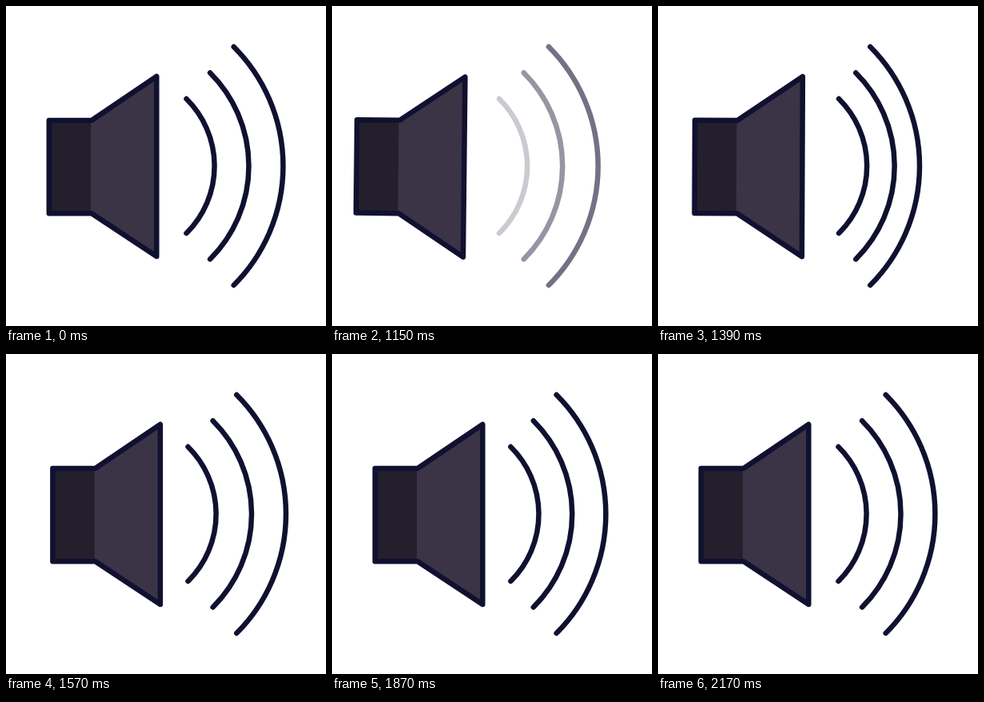
Animation of 400x400 px, one loop 2.23 s. Source, as an HTML page with a canvas:

```html
<!DOCTYPE html>
<html lang="en">
<head>
<meta charset="utf-8">
<title>Speaker</title>
<style>
  html, body { margin: 0; width: 100%; height: 100%; overflow: hidden; background: #fff; }
  canvas { display: block; width: 400px; height: 400px; }
</style>
</head>
<body>
<canvas id="stage" width="400" height="400"></canvas>
<script>
const ctx = document.getElementById('stage').getContext('2d');
const LOOP = 2230, START = 1030, STEP = 30, LAST = 2170;
const INK = '#101130', BOX = '#241f2c', CONE = '#3b3346';
const WAVES = 3, LEAD = 978;

// Eased progress from 0 to 1 between two times.
function glide(t, from, to) {
  const u = Math.min(1, Math.max(0, (t - from) / (to - from)));
  return u * u * (3 - 2 * u);
}

function drawSpeaker(t) {
  const left = 53.8, neck = 107, right = 188.3, middle = 200.9;
  const recoil = glide(t, LEAD, 1172);
  const x = -24 * recoil + 28.6 * glide(t, 1172, 1575) - 4.6 * glide(t, 1575, 1830);
  const tilt = 0.65 * (recoil - glide(t, 1172, 1550));

  const outline = new Path2D();
  outline.moveTo(left, 143);
  outline.lineTo(neck, 143);
  outline.lineTo(right, 88);
  outline.lineTo(right, 313);
  outline.lineTo(neck, 259.3);
  outline.lineTo(left, 259.3);
  outline.closePath();

  ctx.save();
  ctx.translate(121 + x, middle);
  ctx.rotate(tilt * Math.PI / 180);
  ctx.translate(-121, -middle);
  ctx.fillStyle = CONE;
  ctx.fill(outline);
  ctx.fillStyle = BOX;
  ctx.fillRect(left, 143, 106 - left, 116.3);
  ctx.stroke(outline);
  ctx.restore();
}

// Pulled back, thrown past rest, back a little, then settled; outer waves lag.
function waveOffset(i, t) {
  const dip = 1216 + 40 * i, peak = dip + 228 + 20 * i * i;
  const low = 1790 + 48 * i, rest = 2086 + 47 * i;
  const pull = 20.3 + 3 * i, throwOut = 4 + 0.3 * i, rebound = 2.6 + 0.8 * i;
  return -pull * glide(t, LEAD + 8 * i, dip)
    + (pull + throwOut) * glide(t, dip, peak)
    - (throwOut + rebound) * glide(t, peak, low)
    + rebound * glide(t, low, rest);
}

function drawWave(i, t) {
  const half = 84 + 32.5 * i, depth = 35.1 + 13.3 * i;
  const radius = (half * half + depth * depth) / (2 * depth);
  const angle = Math.asin(half / radius);
  const centre = 225.5 + 29.6 * i + depth - radius + waveOffset(i, t);
  const hidden = 1202 + 51 * i;
  ctx.globalAlpha = 1 - glide(t, START, hidden) + glide(t, hidden, hidden + 66);
  ctx.beginPath();
  ctx.arc(centre, 200, radius, -angle, angle);
  ctx.stroke();
  ctx.globalAlpha = 1;
}

function draw(time) {
  const t = time < START ? 0
    : Math.min(LAST, START + STEP * Math.floor((time - START) / STEP));
  ctx.fillStyle = '#fff';
  ctx.fillRect(0, 0, 400, 400);
  ctx.strokeStyle = INK;
  ctx.lineWidth = 6.5;
  ctx.lineCap = ctx.lineJoin = 'round';
  drawSpeaker(t);
  for (let i = 0; i < WAVES; i++) drawWave(i, t);
}

const origin = performance.now();
function tick() {
  draw((performance.now() - origin) % LOOP);
  requestAnimationFrame(tick);
}
tick();
</script>
</body>
</html>
```
